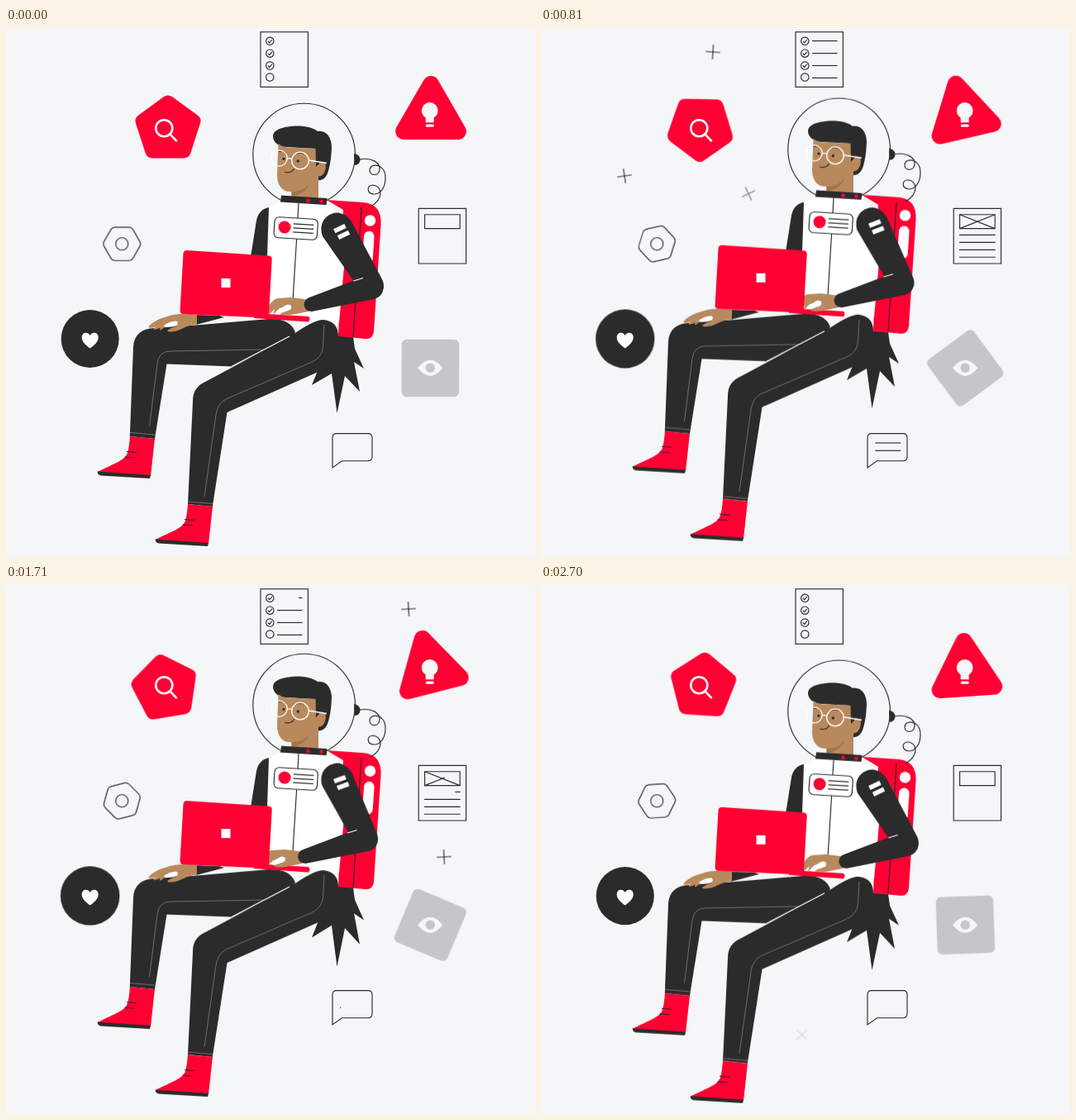
Animation of 640 by 640 pixels, one loop 2.73 s. Source, as an HTML page without scripts:

```html
<!DOCTYPE html>
<html lang="en">
<head>
<meta charset="utf-8">
<title>Astronaut at work</title>
<style>
  :root { --red: #ff0033; --ink: #2b2b2b; --bg: #f4f6f8; --skin: #b9895e; --loop: 2730ms; }
  html, body { margin: 0; width: 100%; height: 100%; overflow: hidden; background: var(--bg); }
  svg { display: block; width: 100vw; height: 100vh; }

  .red { fill: var(--red); }
  .ink { fill: var(--ink); }
  .skin { fill: var(--skin); }
  .white { fill: #fff; }
  .pale { fill: var(--bg); }
  .line { fill: none; stroke: var(--ink); stroke-width: 1.15; }
  .seam { fill: none; stroke: #777; stroke-width: .9; }
  .mark { fill: none; stroke: #fff; }
  .rounded { stroke: var(--red); stroke-linejoin: round; }

  /* floating badges */
  .spin { animation: spin var(--loop) linear infinite; }
  .back { animation-direction: reverse; }
  .half { animation-name: half; }
  .pulse { transform-origin: 101.7px 376px; animation: pulse 455ms cubic-bezier(.37, 0, .63, 1) infinite alternate; }
  @keyframes spin { to { transform: rotate(360deg); } }
  @keyframes half { to { transform: rotate(180deg); } }
  @keyframes pulse { from { transform: scale(1); } to { transform: scale(1.171); } }

  /* astronaut */
  .bob { animation: bob 1365ms linear infinite alternate; }
  .forearm { animation: slide 1365ms linear infinite alternate; }
  .upper { transform-origin: 401px 243px; animation: swing 1365ms linear infinite alternate; }
  .flame { transform-origin: 400px 374px; animation: flare var(--loop) linear infinite; }
  @keyframes bob { to { transform: translateY(-10.6px); } }
  @keyframes slide { to { transform: translate(-10px, 2.5px); } }
  @keyframes swing { to { transform: rotate(7.5deg); } }
  @keyframes flare {
    0%, 100% { transform: scaleY(1); }
    18.7%, 47%, 62% { transform: scaleY(1.04); }
    29.7% { transform: scaleY(1.005); }
    77% { transform: scaleY(1.05); }
  }

  /* lines that write themselves and wipe off again */
  .write { fill: none; stroke: var(--ink); stroke-width: 1.15; stroke-dasharray: 1 2;
    animation: write var(--loop) linear infinite;
    animation-delay: calc(var(--i, 0) * 137ms + 93ms - var(--loop)); }
  .slow { animation-name: writeSlow; }
  .undo { animation-name: writeUndo; }
  @keyframes write {
    0% { stroke-dashoffset: 1; } 5%, 55% { stroke-dashoffset: 0; } 60%, 100% { stroke-dashoffset: -1; }
  }
  @keyframes writeSlow {
    0% { stroke-dashoffset: 1; } 10%, 55% { stroke-dashoffset: 0; } 65%, 100% { stroke-dashoffset: -1; }
  }
  @keyframes writeUndo {
    0% { stroke-dashoffset: 1; } 5%, 49.4% { stroke-dashoffset: 0; } 54.4%, 100% { stroke-dashoffset: 1; }
  }

  /* twinkling crosses, --at is the moment each one appears */
  .cross { opacity: 0; animation: twinkle var(--loop) linear infinite;
    animation-delay: calc(var(--at) * 1ms - var(--loop)); }
  @keyframes twinkle {
    0% { opacity: 0; transform: rotate(-45deg); }
    4% { opacity: 1; }
    6% { transform: rotate(0deg); }
    17% { transform: rotate(0deg); }
    20.2% { opacity: 1; }
    23% { transform: rotate(-45deg); }
    24.4%, 100% { opacity: 0; transform: rotate(-45deg); }
  }
  .i1 { --i: 1; } .i2 { --i: 2; } .i3 { --i: 3; }
</style>
</head>
<body>
<svg viewBox="0 0 640 640">
  <defs>
    <path id="plus" class="line" d="M-8.8 0H8.8M0-8.8V8.8"/>
    <g id="tick"><circle class="line" r="4.7"/><path class="line" d="M-2.4 0L-.6 2L2.6-1.8"/></g>
    <g id="boot">
      <path class="red" d="M150 494L180 497L175 542L111 537C125 529 144 524 147 514Q149 507 150 494Z"/>
      <path class="ink" d="M110.500 536.500L175 541L174 545L115 541.500Q111 541 110.500 536.500Z"/>
      <path class="line" d="M146 512.500L158 513.500M143.500 519L155.500 520"/>
    </g>
  </defs>

  <!-- crosses -->
  <g transform="translate(101 179) rotate(-4)"><use href="#plus" class="cross" style="--at:330"/></g>
  <g transform="translate(103 454) rotate(-4)"><use href="#plus" class="cross" style="--at:130"/></g>
  <g transform="translate(208 29) rotate(4)"><use href="#plus" class="cross" style="--at:635"/></g>
  <g transform="translate(251 200.500)"><use href="#plus" class="cross" style="--at:740"/></g>
  <g transform="translate(487 29) rotate(4)"><use href="#plus" class="cross" style="--at:1220"/></g>
  <g transform="translate(530 329) rotate(-3)"><use href="#plus" class="cross" style="--at:1540"/></g>
  <g transform="translate(487 501) rotate(14)"><use href="#plus" class="cross" style="--at:1800"/></g>
  <g transform="translate(315.500 544)"><use href="#plus" class="cross" style="--at:2050"/></g>

  <!-- checklist -->
  <rect class="line" x="308" y="4.800" width="57.400" height="66.600"/>
  <use href="#tick" x="319.300" y="15.800"/>
  <use href="#tick" x="319.300" y="30.700"/>
  <use href="#tick" x="319.300" y="45.500"/>
  <circle class="line" cx="319.300" cy="59.500" r="4.700"/>
  <path class="write" pathLength="1" d="M328 15.600H358.500"/>
  <path class="write i1" pathLength="1" d="M328 30.600H358.500"/>
  <path class="write i2" pathLength="1" d="M328 45.500H358.500"/>
  <path class="write i3" pathLength="1" d="M328 60.400H358.500"/>

  <!-- article -->
  <path class="line" d="M499.200 218.400H556.600V285H499.200ZM506.600 225.700H549.200V242.600H506.600Z"/>
  <path class="write slow" pathLength="1" d="M549.200 225.700L506.600 242.600"/>
  <path class="write slow i2" pathLength="1" d="M506.600 225.700L549.200 242.600"/>
  <path class="write" pathLength="1" d="M506 250.400H549.700"/>
  <path class="write i1" pathLength="1" d="M506 259.400H549.700"/>
  <path class="write i2" pathLength="1" d="M506 268.300H549.700"/>
  <path class="write i3" pathLength="1" d="M506 277.200H549.700"/>

  <!-- speech bubble -->
  <path class="line" d="M400 490.600H438Q443 490.600 443 495.600V518.500Q443 523.700 438 523.700H406.500L395 532V495.600Q395 490.600 400 490.600Z"/>
  <path class="write undo" pathLength="1" d="M404.200 502H435.200"/>
  <path class="write undo i1" pathLength="1" d="M404.200 511.300H435.200"/>

  <!-- pentagon, triangle, nut, heart, eye -->
  <path class="spin back red rounded" style="transform-origin:193.7px 123px" stroke-width="18" d="M196 90.600L226.400 112.700L214.800 148.500H177.200L165.600 112.700Z"/>
  <g class="mark" stroke-width="2.600" stroke-linecap="round"><circle cx="191.300" cy="121.200" r="10"/><path d="M199.300 129.300L206 136.300"/></g>

  <path class="spin red rounded" style="transform-origin:512.7px 104px" stroke-width="20" d="M514 68L546.900 125H481.100Z"/>
  <g class="pale"><circle cx="512.700" cy="100" r="9.900"/><path d="M507.700 106H517.700V114.300H507.700Z"/><rect x="507.800" y="116.400" width="9.900" height="3.300" rx="1.500"/></g>

  <g transform="translate(140.300 261.200)">
    <path class="line spin" d="M21.800 2.600L13.200 17.600Q11.600 20.200 8.600 20.200H-8.600Q-11.600 20.200-13.200 17.600L-21.800 2.600Q-23.300 0-21.800-2.600L-13.200-17.600Q-11.600-20.200-8.600-20.200H8.600Q11.600-20.200 13.200-17.600L21.800-2.600Q23.300 0 21.800 2.600Z"/>
    <circle class="line" r="7.500"/>
  </g>

  <circle class="ink pulse" cx="101.700" cy="376" r="35"/>
  <path class="white" d="M101.700 387.500C97 384 91.700 380 91.700 374.500C91.700 368 99 367 101.700 372C104.400 367 111.700 368 111.700 374.500C111.700 380 106.500 384 101.700 387.500Z"/>

  <rect class="spin half" style="transform-origin:513.4px 411.4px" x="478.600" y="376.700" width="69.600" height="69.600" rx="6.500" fill="#c6c6c8"/>
  <path class="pale" d="M498 411.300Q513.200 392 528.400 411.300Q513.200 430.600 498 411.300Z"/>
  <circle cx="513.200" cy="411.300" r="5.700" fill="#c6c6c8"/>

  <g class="bob">
    <path class="ink flame" d="M398 372L420 374L422 388L433 412L421 404L428 440L410 421L400.500 466L394 418L370 432L383 400Z"/>

    <!-- backpack -->
    <path class="red" d="M388 208L432 211Q455 213 453.500 238L445 367Q444 376.500 435 376L402 373L408 220Z"/>
    <path class="line" d="M430 216L420 374"/>
    <circle class="white" cx="440.500" cy="233" r="6.700"/>
    <path class="mark" stroke-width="12.500" stroke-linecap="round" d="M439.300 252L437.500 279"/>

    <!-- helmet -->
    <circle class="line" cx="360.600" cy="153" r="61.800"/>
    <path class="ink" d="M421 152Q428.500 153 428.500 159.500Q428 166 421.500 166Z"/>
    <path class="line" d="M428 159C442 156 453 163 452 171C451 180 440 179 440 172C440 163 459 163 459 181C459 196 451 201 445 201C436 200 436 190 444 190C455 191 458 206 441 216"/>

    <!-- head -->
    <path class="ink" d="M323 131C323 122 338 119 352 118.500C364 118.500 372 121 377 125C387 123 394 132 394 144C393.500 160 391 172 388 178C385 183 381 185 377 184L374 146L340 144C330 144 323 138 323 131Z"/>
    <path class="skin" d="M329.500 140Q334 144 341 144.500L376.500 146V164Q383 159 386.500 164C388 172 384 180 378 179.500V207H345.500V198C335 199 328 191 328 178Z"/>
    <path fill="#a27347" d="M345.500 198C355 198 362 195 367 188.500C364 197 357 202 345.500 203Z"/>
    <path class="ink" d="M374.500 144L380 145L379 164L375 168Z"/>
    <g class="ink"><circle cx="336" cy="158.300" r="1.600"/><circle cx="353.300" cy="161" r="1.700"/></g>
    <path class="line" stroke-linecap="round" d="M330.500 149.500Q335 148 338 151M349 153Q355 149.500 361 152M337.500 174.500Q345 176 348.500 170.500"/>
    <g class="mark" stroke-width="1.300"><circle cx="330.500" cy="157.500" r="9.700"/><circle cx="356" cy="160.500" r="10.300"/><path d="M340 158.500Q343 156.500 345.800 159M366.300 160L388 163.500"/></g>

    <!-- torso -->
    <path class="ink" d="M296 277L302.500 236C304 224 310 218 319 217L317 278Z"/>
    <path class="white" d="M333 210L388 213L414 232L408 300L403 356L318 352L316 277L318 217Z"/>
    <path class="line" d="M354 212L351.500 257L347 330"/>
    <path class="ink" d="M333 202.500L388.500 206L387.500 214L332 210.500Z"/>
    <g class="red"><circle cx="365.500" cy="209" r="2.400"/><circle cx="381.500" cy="209.800" r="2.400"/></g>
    <g transform="rotate(3.500 350.500 242.500)">
      <rect class="line" style="fill:#fff" x="324.500" y="230" width="52.400" height="25" rx="5.500"/>
      <circle class="red" cx="337" cy="241.800" r="7.500"/>
      <path class="line" d="M347.500 237H372M347.500 242H372M347.500 247H372"/>
    </g>

    <!-- rear leg, hand -->
    <path class="ink" d="M229 347L258 348L264 350L230 359Z"/>
    <path class="ink" d="M180 363L230 359.500L318 352Q344 351 350 368L345 375L274 409.500L194.500 406.500L180 497L149.800 494L154 386Q155 364 180 363Z"/>
    <path class="seam" d="M173.500 482L183 406Q185 391 199 391L312 389M150 489.500L180 492"/>
    <path class="skin" d="M231 346.500C216 345 204 346 195 349C184 352 175 357 172 362Q176 364 183 360.500Q177 364 179 365Q185 364 189 361.500Q184 365 187 365.500L193 361H207Q199 362.500 195 366Q196 368.500 203 367C212 366 216 360 231 358.500Z"/>
    <path class="white" d="M190 360.500Q198 354.500 206 354.500Q209 356 207 359.500Q200 362 190 360.500Z"/>
    <use href="#boot"/>

    <!-- front leg -->
    <path class="ink" d="M344 373Q372 353 384 353Q402 355 402 373V392Q402 404 389 411L267.500 465L249.800 579L220 576L226 452C226 438 232 432 243 427Z"/>
    <path class="mark" stroke-width="1.300" d="M273 409.500L343 373"/>
    <path class="seam" d="M240 567L254 468Q256 454 266 449L368 405Q383 399 383.500 385L385 359M220.500 573L250 575.500"/>
    <use href="#boot" x="70" y="82"/>

    <!-- right arm and laptop -->
    <path class="red" d="M300 345L366 349Q369 352 366 355.500L300 351Z"/>
    <g class="forearm">
      <path class="skin" d="M366 328.500L345 326L328 327C321 330 317 336 316 342L319 346L325 340L323 347L331 339L344 335Q347 339 341 341L331 346Q336 348.500 345 347L366 343Z"/>
      <path class="white" d="M330 345Q334 336 341 334.500Q347 335 344.500 340.500Q339 343 330 345Z"/>
    </g>
    <g class="upper">
      <path class="ink" d="M383 252C377 235 389 223 402 223.500Q415 226 420 238L455 304C463 320 444 334 431 321Z"/>
      <path class="mark" stroke-width="5.500" d="M397.300 245.800L410.500 239.500M402 253.500L415 247.300"/>
    </g>
    <g class="forearm">
      <path class="ink" d="M367 326L421 305.500L440 297C451 296 457 305 456.800 314Q456 325 445 328L370 343Q362 343 360.500 335Q361 328 367 326Z"/>
      <path class="mark" stroke-width="1.200" d="M420.500 306L432 302.500"/>
    </g>
    <path class="red" d="M219 269L318 275.500Q322 276 321.700 280L318 346Q317.500 351 313 350.500L214 346Q210.300 345.500 210.600 341L214.500 273Q215 268.700 219 269Z"/>
    <rect class="white" x="260.500" y="303" width="11" height="11"/>
  </g>
</svg>
</body>
</html>
```
